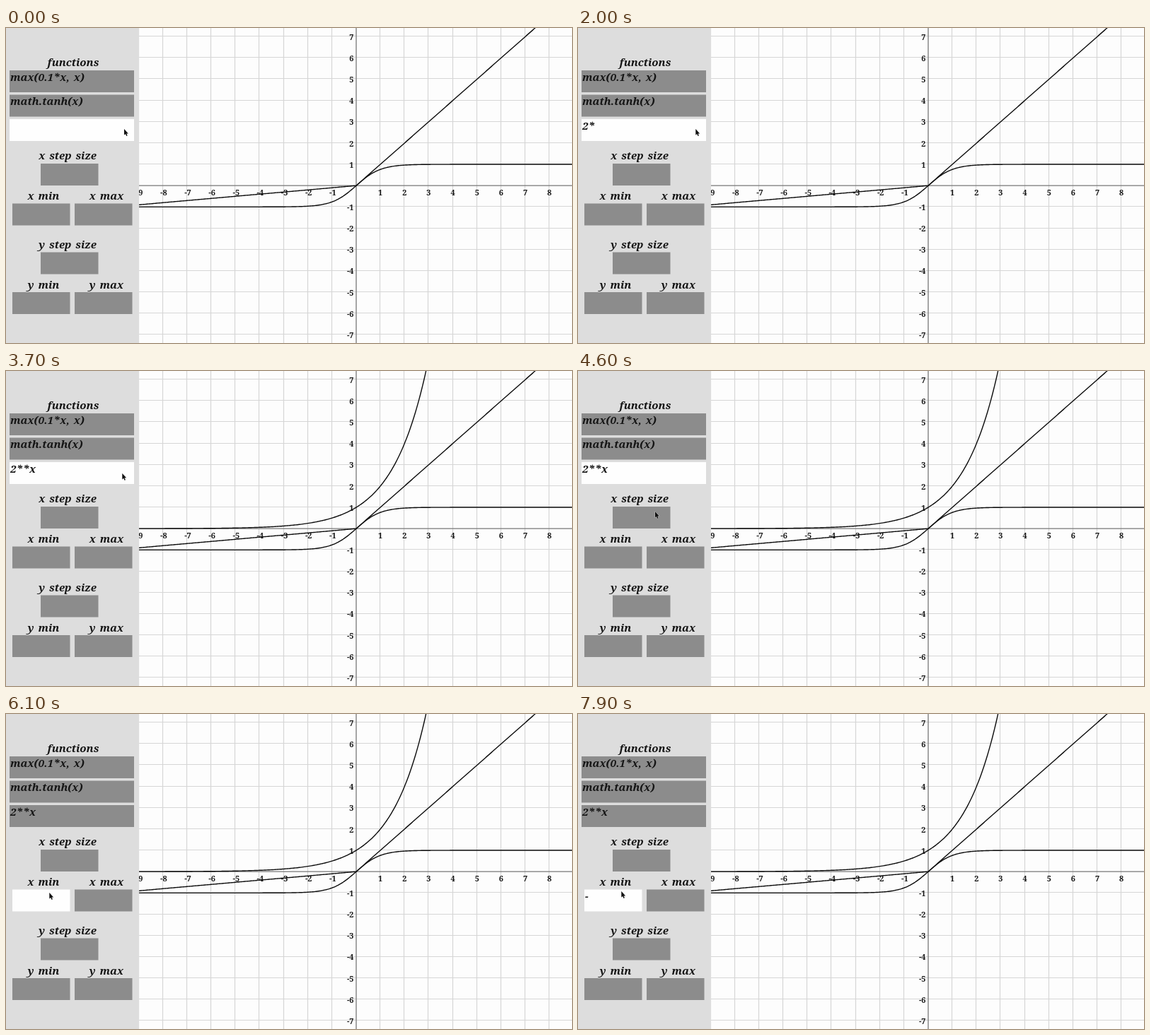
These frames come from a looping animation (800 by 446 pixels, 8 s). An HTML page:

```html
<!DOCTYPE html>
<html lang="en">
<head>
<meta charset="utf-8">
<title>Function plotter</title>
<style>
html, body { margin: 0; width: 100%; height: 100%; overflow: hidden; background: #fdfdfd; }
svg { display: block; width: 800px; height: 446px; }
text { font-family: "Noto Serif", "Liberation Serif", serif; font-weight: 600; fill: #141414; }
.ui { font-size: 15px; font-style: italic; word-spacing: 2px; white-space: pre; }
.num { font-size: 11px; }
.mid { text-anchor: middle; }
.end { text-anchor: end; }
.curve { fill: none; stroke: #0c0c0c; stroke-width: 1.4; stroke-linejoin: round; }
</style>
</head>
<body>
<svg id="stage" viewBox="0 0 800 446"></svg>
<script>
const LOOP = 8000, OX = 495, OY = 223.2, UX = 34.15, UY = 30.15;
const stage = document.getElementById('stage');

function add(tag, attrs, text) {
  const el = document.createElementNS('http://www.w3.org/2000/svg', tag);
  for (const k in attrs) el.setAttribute(k, attrs[k]);
  if (text !== undefined) el.textContent = text;
  stage.appendChild(el);
  return el;
}
const rect = (x, y, width, height, fill) => add('rect', { x, y, width, height, fill });
const line = (x1, y1, x2, y2, stroke, w) =>
  add('line', { x1, y1, x2, y2, stroke, 'stroke-width': w });
const px = x => OX + x * UX;
const py = y => OY - y * UY;

function plot(fn) {
  let d = '';
  for (let x = -9.1; x <= 9.1; x += 0.05) {
    const y = fn(x);
    if (y > 9) break;
    d += (d ? 'L' : 'M') + px(x).toFixed(2) + ' ' + py(y).toFixed(2);
  }
  return add('path', { d, class: 'curve' });
}

// Plot area
rect(0, 0, 800, 446, '#fdfdfd');
for (let i = -9; i <= 8; i++) {
  const x = Math.round(px(i)) - 0.5;
  if (i) line(x, 0, x, 446, '#d6d6d6', 1.2);
}
for (let i = -7; i <= 7; i++) {
  const y = Math.round(py(i)) - 0.5;
  if (i) line(188, y, 800, y, '#d6d6d6', 1.2);
}
line(188, OY, 800, OY, '#777', 1.3);
line(OX, 0, OX, 446, '#777', 1.3);
for (let i = -9; i <= 8; i++)
  if (i) add('text', { x: px(i) + (i < 0 ? 1 : 0), y: 236.5, class: 'num mid' }, i);
for (let i = -7; i <= 7; i++)
  if (i) add('text', { x: 491.5, y: py(i) + 4.6, class: 'num end' }, i);

plot(x => Math.max(0.1 * x, x));
plot(Math.tanh);
const power = plot(x => 2 ** x);

// Side panel
rect(0, 0, 188, 446, '#dddddd');
const label = (s, x, y) => add('text', { x, y, class: 'ui mid' }, s);
label('functions', 95, 54);
label('x step size', 87, 186);
label('x min', 53, 243);
label('x max', 142, 243);
label('y step size', 87, 312);
label('y min', 53, 369);
label('y max', 142, 369);

function field(x, y, w, s = '') {
  const box = rect(x, y, w, 31, '#8c8c8c');
  const text = add('text', { x: x + 1, y: y + 14.7, class: 'ui' }, s);
  return { box, text };
}
field(5, 60, 176, 'max(0.1*x, x)');
field(5, 94.5, 176, 'math.tanh(x)');
const third = field(5, 129, 176);
const xStep = field(49, 192, 81.5);
const xMin = field(9, 248.5, 81.5);
field(97, 248.5, 81.5);
field(49, 317.5, 81.5);
field(9, 374, 81.5);
field(97, 374, 81.5);

const pointer = add('path', {
  d: 'M0 0V8.6L1.9 6.9L3.2 9.9L4.6 9.3L3.3 6.4H5.8Z',
  fill: '#111', stroke: '#eee', 'stroke-width': 0.7, 'paint-order': 'stroke'
});

// Timed values: [start ms, value]
const typed = [[0, ''], [800, 'e'], [1500, ''], [1700, '2'], [2000, '2*'], [2300, '2**'], [2700, '2**x']];
const focus = [[0, third], [4900, xStep], [5900, xMin]];
// Pointer stops: [ms, x, y]
const stops = [
  [0, 167, 143], [600, 166.3, 143], [3600, 166.3, 143], [4500, 109, 199],
  [4700, 109, 199], [5000, 110, 205.5], [5300, 110, 205.5],
  [5850, 61.3, 253], [6750, 61.3, 253], [6800, 61.3, 251], [LOOP, 61.3, 251]
];

function at(list, t) {
  let v = list[0][1];
  for (const [start, value] of list) if (t >= start) v = value;
  return v;
}

function pointerAt(t) {
  const i = stops.findIndex(s => s[0] > t);
  const [t0, x0, y0] = stops[i - 1], [t1, x1, y1] = stops[i];
  const u = (t - t0) / (t1 - t0), k = u * u * (3 - 2 * u);
  return [x0 + (x1 - x0) * k, y0 + (y1 - y0) * k];
}

function draw(t) {
  const active = at(focus, t);
  for (const f of [third, xStep, xMin])
    f.box.setAttribute('fill', f === active ? '#fefefe' : '#8c8c8c');
  third.text.textContent = at(typed, t);
  xMin.text.textContent = t >= 7200 ? '-' : '';
  power.setAttribute('visibility', t >= 3300 ? 'visible' : 'hidden');
  pointer.setAttribute('transform', `translate(${pointerAt(t)})`);
}

const begin = performance.now();
function tick() {
  draw((performance.now() - begin) % LOOP);
  requestAnimationFrame(tick);
}
draw(0);
requestAnimationFrame(tick);
</script>
</body>
</html>
```
